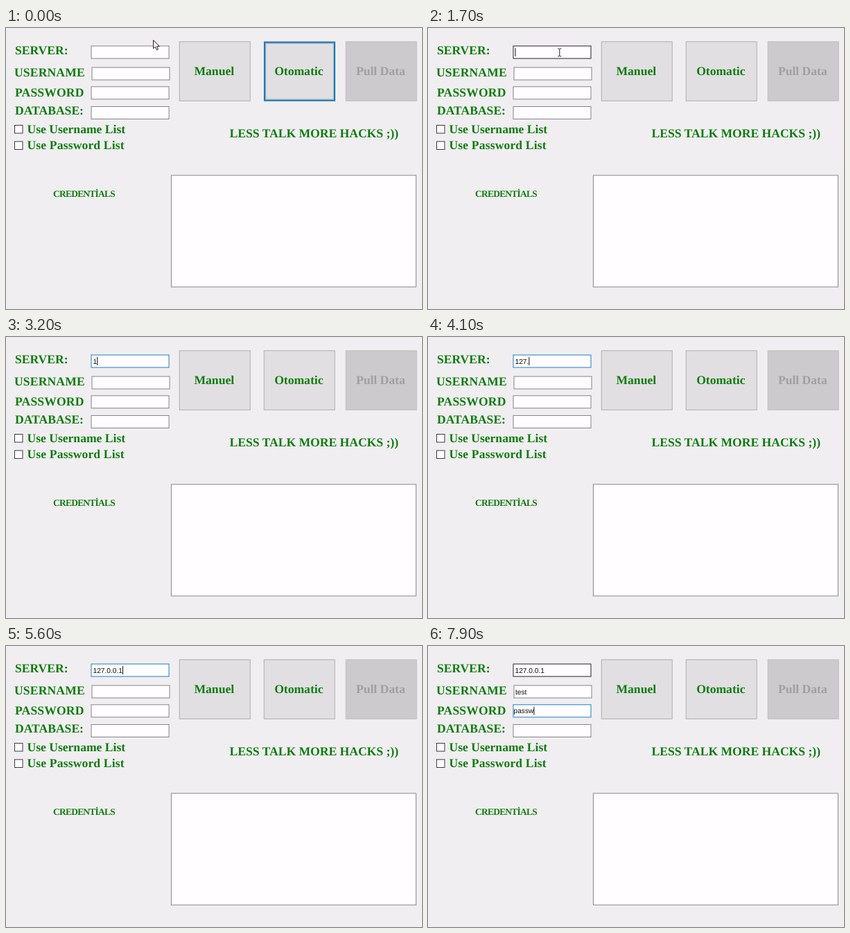
An HTML page that plays this animation: 600x406 px, repeating every 8000 ms.

```html
<!DOCTYPE html>
<html lang="en">
<head>
<meta charset="utf-8">
<title>Login form</title>
<style>
html, body { margin: 0; width: 100%; height: 100%; overflow: hidden; background: #f0eef0; }
svg { display: block; width: 100vw; height: 100vh; }
text { font-kerning: none; white-space: pre; text-rendering: geometricPrecision; }
.label { font: bold 17.58px "Liberation Serif", "Times New Roman", serif; fill: #0f7c0f; }
.wide { letter-spacing: .15px; }
.small { font-size: 13.4px; letter-spacing: -.7px; }
.off { fill: #a1a0a1; }
.mid { text-anchor: middle; }
.typed { font: 10.2px "Liberation Sans", Arial, sans-serif; fill: #111; }
</style>
</head>
<body>
<svg id="stage" viewBox="0 0 600 406"></svg>
<script>
const LOOP = 8000;
const BLUE = '#1c80c4', DARK = '#252525', GREY = '#858488', PAPER = '#fffdff';
const stage = document.getElementById('stage');

function add(tag, attrs, text) {
  const el = document.createElementNS('http://www.w3.org/2000/svg', tag);
  for (const k in attrs) el.setAttribute(k, attrs[k]);
  if (text) el.textContent = text;
  stage.appendChild(el);
  return el;
}
const box = (x, y, width, height, fill, stroke, w = 1) =>
  add('rect', { x, y, width, height, fill, stroke, 'stroke-width': w });
const label = (x, y, text, kind = '') => add('text', { x, y, class: 'label ' + kind }, text);

function button(x, text, off) {
  box(x + .2, 19.8, 102, 85.5, off ? '#cccacc' : '#e1dfe1', off ? '#c0bec0' : '#b0aeb0');
  label(x + 50.3, 68, text, 'mid' + (off ? ' off' : ''));
}

function field(x, y, textX) {
  return {
    textX, y,
    frame: box(x + .5, y + .5, 112, 18, PAPER, GREY),
    text: add('text', { x: textX, y: y + 13, class: 'typed' })
  };
}

label(13, 38, 'SERVER:');
label(12, 70, 'USERNAME', 'wide');
label(13, 98.6, 'PASSWORD', 'wide');
label(13, 124.6, 'DATABASE:');
label(30.5, 151.6, 'Use Username List');
label(30.5, 175, 'Use Password List', 'wide');
label(322.5, 158, 'LESS TALK MORE HACKS ;))');
label(68, 244.4, 'CREDENTİALS', 'small');
for (const y of [140.5, 164]) box(12.5, y, 11.5, 11.5, PAPER, '#3c3c3c');
box(238.4, 212.9, 353, 161.2, PAPER, '#87868a');

button(250, 'Manuel');
button(372, 'Otomatic');
button(490, 'Pull Data', true);
const ring = [
  box(373, 20.7, 101, 84, 'none', '#1779bd', 2),
  box(374.7, 22.4, 97.6, 80.6, 'none', '#4a6678', .8)
];
ring[1].setAttribute('stroke-dasharray', '1 1');

const server = field(122.5, 25.5, 125.5);
const user = field(123.5, 56.5, 126);
const pass = field(122.5, 84.3, 123.5);
field(122.5, 113, 126);

const caret = add('path', { d: 'M0 3.5V15.5', stroke: '#111', 'stroke-width': 1 });
const arrow = add('path', {
  d: 'M0 0V12.2L2.8 9.6L4.9 14.3L6.9 13.4L4.9 8.9H8.7Z',
  fill: '#fff', stroke: '#222', 'stroke-width': 1
});
const beam = add('path', {
  d: 'M-2.5 -5.5H-.8L0 -4.8L.8 -5.5H2.5M0 -4.8V4.8M-2.5 5.5H-.8L0 4.8L.8 5.5H2.5',
  fill: 'none', stroke: '#222', 'stroke-width': 1
});

// each time is the moment its character appears
const HOVER = 1100, CLICK = 1400, TAB1 = 5900, TAB2 = 7300;
const entries = [
  { f: server, from: CLICK, to: TAB1, text: '127.0.0.1',
    keys: [3200, 3500, 3700, 4000, 4400, 4700, 4900, 5100, 5400] },
  { f: user, from: TAB1, to: TAB2, text: 'test', keys: [6500, 6700, 7000, 7100] },
  { f: pass, from: TAB2, to: LOOP, text: 'passw', keys: [7400, 7500, 7600, 7800, 7900] }
];
const FIRST_KEY = entries[0].keys[0];

const path = [[0, 212.5, 17.5], [50, 212.5, 17.5], [400, 196, 24], [650, 196, 24],
  [1000, 183.5, 35.5], [1500, 183.5, 35.5], [2100, 207.5, 35]];

function pointer(t) {
  const i = path.findIndex(p => p[0] > t);
  if (i < 0) return path[path.length - 1].slice(1);
  const [t0, x0, y0] = path[i - 1], [t1, x1, y1] = path[i];
  const k = (t - t0) / (t1 - t0), e = k * k * (3 - 2 * k);
  return [x0 + (x1 - x0) * e, y0 + (y1 - y0) * e];
}

const show = (el, on) => el.setAttribute('visibility', on ? 'visible' : 'hidden');
const move = (el, x, y) => el.setAttribute('transform', `translate(${x} ${y})`);

function draw(t) {
  const [px, py] = pointer(t);
  move(arrow, px, py);
  move(beam, px, py);
  show(arrow, t < HOVER);
  show(beam, t >= HOVER && t < FIRST_KEY);
  ring.forEach(r => show(r, t < CLICK));

  let caretOn = false;
  for (const { f, from, to, text, keys } of entries) {
    const pressed = keys.filter(k => k <= t);
    const focus = t >= from && t < to;
    const hot = f === server && t >= HOVER && (t < FIRST_KEY || t >= TAB1);
    f.text.textContent = text.slice(0, pressed.length);
    f.frame.setAttribute('stroke', hot ? DARK : focus ? BLUE : GREY);
    if (!focus) continue;
    const since = t - (pressed.length ? pressed[pressed.length - 1] : from);
    caretOn = since % 1060 < 530;
    const width = pressed.length ? f.text.getComputedTextLength() : 0;
    move(caret, f.textX + width + .5, f.y);
  }
  show(caret, caretOn);
}

const start = performance.now();
function tick() {
  draw((performance.now() - start) % LOOP);
  requestAnimationFrame(tick);
}
tick();
</script>
</body>
</html>
```
